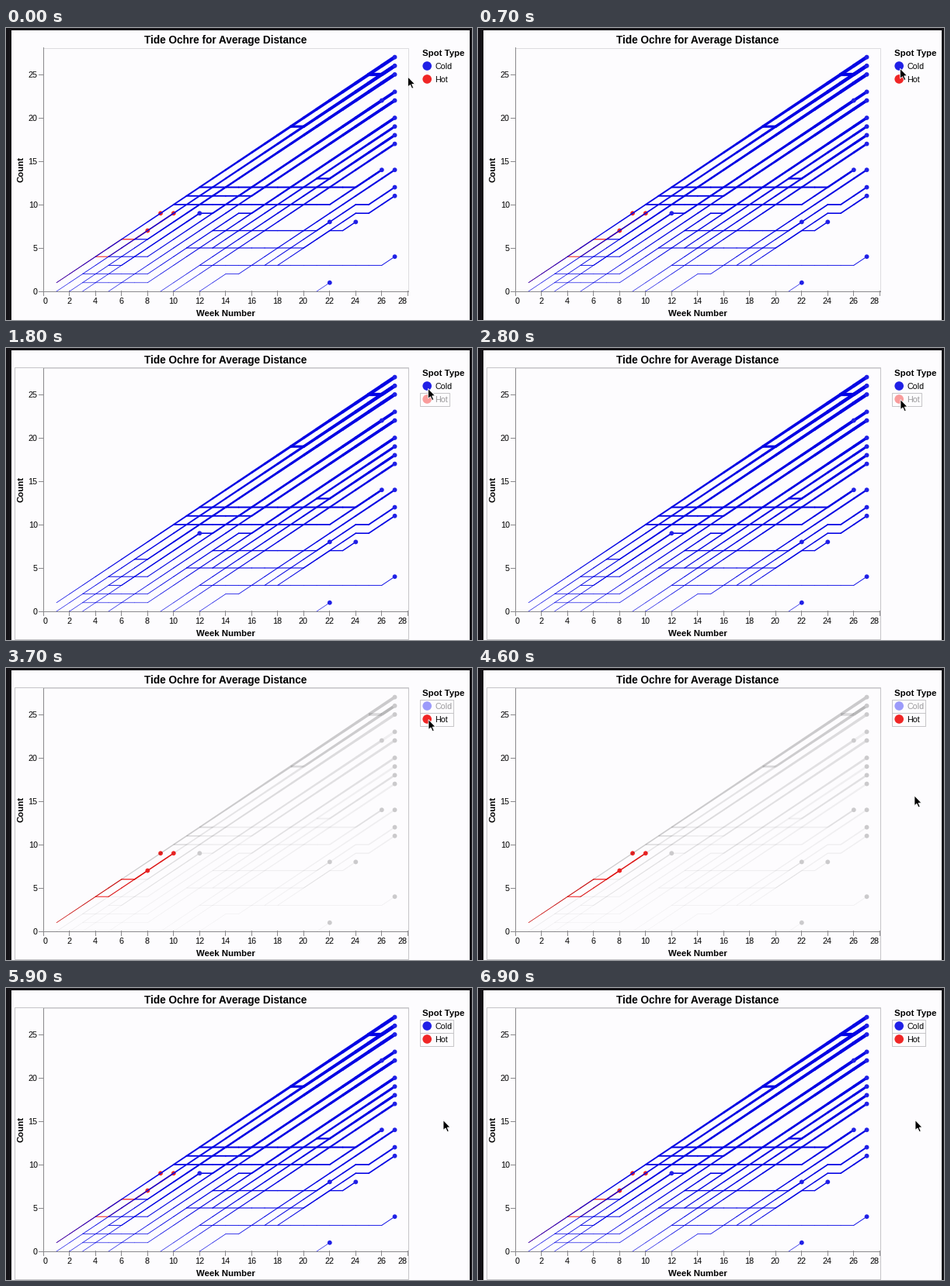
These frames come from a looping animation (600 px wide and 377 px high, 7000 ms). A matplotlib script:

```python
import matplotlib.pyplot as plt
import numpy as np
from matplotlib.animation import FuncAnimation
from matplotlib.collections import LineCollection
from matplotlib.colors import to_rgba
from matplotlib.patches import Circle, Polygon, Rectangle

W, H, DPI = 600, 377, 64
STEP, LOOP = 100, 7000
PT = 72 / DPI  # points per pixel
LAST = 27

BLUE, RED = "#0404e4", "#f01414"
DOT_BLUE, DOT_RED, DOT_GRAY = "#2020e6", "#f02626", "#cbcacc"
AXIS, BORDER, FADED = "#8a898c", "#c6c5c8", "#9b9a9c"

plt.rcParams["font.family"] = "Liberation Sans"
fig = plt.figure(figsize=(W / DPI, H / DPI), dpi=DPI, facecolor="#141217")
ax = fig.add_axes([0, 0, 1, 1])
ax.set(xlim=(0, W), ylim=(H, 0))
ax.axis("off")


def px(week):
    return 48.3 + 16.75 * week


def py(count):
    return 340 - 11.2 * count


def walk(week, count, hold=0, pause=None, end=LAST):
    """Weekly (week, count) points: flat for `hold` weeks, then climbing by one
    a week, except during the `pause` week."""
    points = [(week, count)]
    for w in range(week, end):
        count += w >= week + hold and w != pause
        points.append((w + 1, count))
    return points


def cold_walks():
    # Lanes that climb all the way, then lanes that leave the top one.
    walks = [walk(max(lane, 1), max(1 - lane, 0)) for lane in (0, 1, 2, 5, 9, 10)]
    walks += [walk(n, n, 1) for n in (19, 25)]
    walks += [walk(10, 10, 12, end=26), walk(12, 12, 12, end=26), walk(11, 11, 5)]
    # Long flat stretches at low counts
    walks += [walk(3, 1, 5), walk(3, 2, 5, 15), walk(5, 4, 3), walk(7, 6, 1),
              walk(5, 3, 1, end=12), walk(12, 3, 14),
              walk(11, 5, 9, 22, end=24), walk(13, 7, 8, end=22)]
    # Climbs with at most one pause
    walks += [walk(3, 0, pause=12, end=26), walk(12, 0, pause=14),
              walk(17, 3, pause=24), walk(18, 3, pause=24),
              walk(13, 5), walk(21, 13, 1), walk(21, 0, end=22)]
    return walks


COLD = cold_walks()
HOT = [walk(1, 1, end=6), walk(4, 4, 1, end=10), walk(6, 6, 1, end=8)]
COLD_ENDS = {w[-1] for w in COLD}
HOT_ENDS = [(9, 9), (8, 7), (10, 9)]


def trail_width(count):
    return .55 + .1 * count + .002 * count ** 2


def muted(lane):
    return to_rgba("#000000", .055 + .14 * np.exp(-1.2 * lane))


def text(x, y, s, size=10.7, ha="center", va="center_baseline", **kw):
    return ax.text(x, y, s, fontsize=size * PT, ha=ha, va=va, **kw)


def line(xs, ys):
    ax.plot(xs, ys, color=AXIS, lw=PT, zorder=1)


def trails(walks, color, z, scale=1, cap="round"):
    """Lines that widen with the count; `color` maps a lane to a colour."""
    points = [np.array(w, float) for w in walks]
    segments = np.concatenate([np.stack([p[:-1], p[1:]], 1) for p in points])
    weeks, counts = segments[..., 0], segments[..., 1]
    return ax.add_collection(LineCollection(
        np.stack([px(weeks), py(counts)], -1),
        linewidths=trail_width(counts.mean(1)) * scale * PT,
        colors=[color(lane) for lane in (weeks - counts).mean(1)],
        capstyle=cap, zorder=z, snap=False))


def disc(x, y, r, color, z):
    return ax.add_patch(Circle((x, y), r, color=color, lw=0, zorder=z))


def dots(points, color, z=5):
    return [disc(px(w), py(c), 2.9, color, z) for w, c in points]


def box(x0, y0, x1, y1, color=BORDER):
    return ax.add_patch(Rectangle((x0, y0), x1 - x0, y1 - y0, fill=False,
                                  ec=color, lw=PT, zorder=1))


def legend_entry(y, label, color, ink="black"):
    return [disc(542.2, y, 5.8, color, 4),
            text(552.2, y, label, 10.6, "left", color=ink)]


# Page, axes and labels
ax.add_patch(Rectangle((7, 3), 589.5, H, color="#fdfcfe", lw=0, zorder=0))
box(47.5, 25.5, 517.5, 339.5, "#dddcdf")
line([47.5, 47.5], [25, 339.5])
line([47, 517.5], [339.5, 339.5])
for week in range(0, 29, 2):
    x = px(week) - .5
    line([x, x], [339, 345])
    text(np.clip(x, 50.5, 510.5), 352, str(week))
for count in range(0, 26, 5):
    y = py(count) - .5
    line([42, 47], [y, y])
    text(40.7, y + .8, str(count), ha="right")
text(282.5, 14.3, "Tide Ochre for Average Distance", 13.6, weight="bold")
text(283, 368, "Week Number", 11.4, weight="bold")
text(19.2, 182.5, "Count", 11.4, weight="bold", rotation=90, va="center")
text(535.7, 32, "Spot Type", 11.4, "left", weight="bold")

# Artists grouped by what they show; each view lists its groups.
groups = {
    "blue": [trails(COLD, lambda lane: BLUE, 3)] + dots(COLD_ENDS, DOT_BLUE),
    "muted": [trails(COLD, muted, 3, .85, "butt")] + dots(COLD_ENDS, DOT_GRAY),
    "red": [trails(HOT, lambda lane: RED, 2)] + dots(HOT_ENDS, DOT_RED, 2),
    "cold on": legend_entry(49, "Cold", DOT_BLUE),
    "cold off": legend_entry(49, "Cold", "#9c9bfa", FADED),
    "hot on": legend_entry(66, "Hot", DOT_RED),
    "hot off": legend_entry(66, "Hot", "#f99c9c", FADED),
    "frame": [box(10.5, 24.5, 517.5, 375.5)],
    "hot box": [box(532.5, 57.5, 570.5, 74.5)],
    "both boxes": [box(532.5, y, 575.5, y + 17) for y in (40.5, 57.5)],
}
EVERYTHING = {"blue", "red", "cold on", "hot on"}
VIEWS = [
    (0, EVERYTHING),
    (800, {"blue", "cold on", "hot off", "frame", "hot box"}),
    (2900, {"muted", "red", "cold off", "hot on", "frame", "both boxes"}),
    (4800, EVERYTHING | {"frame", "both boxes"}),
]

ARROW = np.array([(0, 0), (0, 13), (3, 10.4), (5.2, 15.2), (7.2, 14.3),
                  (5.1, 9.6), (9, 9.4)])
cursor = ax.add_patch(Polygon(ARROW, fc="black", ec="white", lw=.8 * PT, zorder=9))
REST = np.array([517.5, 63])
MOVES = [(100, 600, (543.5, 52.3)), (2400, 2700, (544, 66.5)),
         (4000, 4700, (563, 170.5))]


def pointer(t):
    tip = REST
    for start, stop, goal in MOVES:
        u = np.clip((t - start) / (stop - start), 0, 1)
        tip = tip + (np.array(goal) - tip) * u * u * (3 - 2 * u)
    return tip


def update(frame):
    t = frame * STEP
    shown = [names for start, names in VIEWS if t >= start][-1]
    for name, artists in groups.items():
        for artist in artists:
            artist.set_visible(name in shown)
    cursor.set_xy(ARROW + pointer(t))
    return []


anim = FuncAnimation(fig, update, frames=LOOP // STEP, interval=STEP,
                     repeat=True, repeat_delay=0, blit=False)
plt.show()
```
